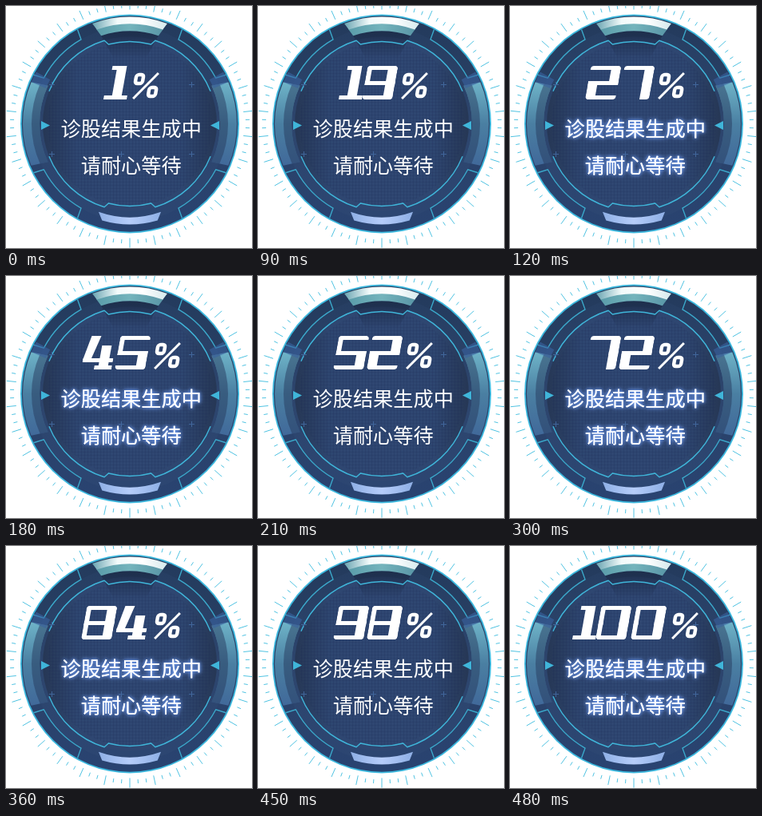
Recreate the animation shown at these times as an HTML page with a canvas. Size 308 by 303 pixels, loop 5.48 s.

```html
<!DOCTYPE html>
<html lang="zh-CN">
<meta charset="utf-8">
<style>
html, body { margin: 0; width: 100%; height: 100%; overflow: hidden; background: #fff }
canvas { display: block }
</style>
<canvas id="stage" width="308" height="303"></canvas>
<script>
const ctx = stage.getContext('2d');
const CX = 155, CY = 147.5, CYAN = '#3fb5d9';
const LOOP = 5480, STEP = 30;
const COUNTS = [1, 7, 13, 19, 27, 36, 45, 52, 59, 66, 72, 78, 84, 89, 94, 98, 100];

// Angles are in degrees, clockwise from the top of the dial.
const rad = a => (a - 90) * Math.PI / 180;
const polar = (r, a) => [CX + r * Math.cos(rad(a)), CY + r * Math.sin(rad(a))];
const arc = (r, a, b) => ctx.arc(CX, CY, r, rad(a), rad(b), b < a);

function disc(r, fill) {
  ctx.beginPath();
  arc(r, 0, 360);
  ctx.fillStyle = fill;
  ctx.fill();
}

function gradient(x0, y0, x1, y1, ...colors) {
  const g = ctx.createLinearGradient(x0, y0, x1, y1);
  colors.forEach((c, i) => g.addColorStop(i / (colors.length - 1), c));
  return g;
}

function block(r0, r1, mid, outer, inner, fill) {
  ctx.beginPath();
  arc(r1, mid - outer, mid + outer);
  arc(r0, mid + inner, mid - inner);
  ctx.closePath();
  ctx.fillStyle = fill;
  ctx.fill();
}

function line(color, width, draw) {
  ctx.beginPath();
  draw();
  ctx.strokeStyle = color;
  ctx.lineWidth = width;
  ctx.stroke();
}

function ticks() {
  for (let i = 0; i < 90; i++) {
    const long = i % 3 === 0;
    line('#4fc3e2', 1, () => {
      ctx.moveTo(...polar(long ? 143 : 145, i * 4));
      ctx.lineTo(...polar(long ? 155 : 150, i * 4));
    });
  }
}

function texture() {
  ctx.save();
  ctx.beginPath();
  arc(103, 0, 360);
  ctx.clip();
  ctx.fillStyle = 'rgba(28,42,85,.16)';
  for (let p = 50; p < 262; p += 4) {
    ctx.fillRect(p, 44, 1, 210);
    ctx.fillRect(50, p - 6, 210, 1);
  }
  ctx.restore();
}

function quadrant(mid) {
  line('#3ba9cb', 1.4, () => {
    ctx.moveTo(...polar(135, mid - 17));
    ctx.lineTo(...polar(122, mid - 16));
    arc(122, mid - 16, mid + 16);
    ctx.lineTo(...polar(135, mid + 17));
  });
}

function frameLine(mid) {
  line(CYAN, 1.4, () => {
    arc(109, mid - 68, mid - 17);
    ctx.lineTo(...polar(103, mid - 15));
    arc(103, mid - 15, mid + 15);
    ctx.lineTo(...polar(109, mid + 17));
    arc(109, mid + 17, mid + 68);
  });
}

function pointer(x, dir) {
  ctx.beginPath();
  ctx.moveTo(x, 144);
  ctx.lineTo(x + dir * 11, 149.5);
  ctx.lineTo(x, 155);
  ctx.fillStyle = CYAN;
  ctx.fill();
}

function sideBlock(mid) {
  block(113, 134, mid, 23, 25, gradient(0, 95, 0, 200, '#6fb4c8', '#4a7fa2', '#41699a'));
  block(113, 123, mid, 24, 25, 'rgba(38,58,95,.5)');
}

function dial() {
  ctx.fillStyle = '#fff';
  ctx.fillRect(0, 0, 308, 303);
  ticks();
  disc(137, '#3bb8de');
  disc(135.2, gradient(0, 12, 0, 283, '#233a5c', '#2a4268', '#294371'));
  disc(122, gradient(0, 26, 0, 270, '#263e62', '#2d456d', '#2c4672'));
  disc(109, gradient(46, 0, 264, 0, '#263755', '#2e4670', '#2f4772', '#2f4772', '#2e4670', '#263755'));
  block(85, 116, 0, 18, 14, gradient(0, 34, 0, 66, 'rgba(28,44,72,.8)', 'rgba(28,44,72,0)'));
  texture();
  [-46, 46, 134, 226].forEach(quadrant);
  frameLine(0);
  frameLine(180);

  block(116, 126, 0, 19.5, 18, gradient(116, 0, 194, 0, '#5c9eab', '#74b4bc', '#5b98a8'));
  block(125, 134, 0, 20.5, 19.3, gradient(108, 0, 202, 0, '#6aa5b2', '#f2fafa', '#fff', '#d5e9ec'));
  sideBlock(90);
  sideBlock(270);
  for (const a of [-64, 64]) block(114, 134, a, 3, 3, 'rgba(58,98,160,.6)');
  block(117, 126, 180, 16, 19.5, gradient(116, 0, 194, 0, '#8eafe5', '#b6cdfa', '#8eafe5'));

  pointer(44, 1);
  pointer(267, -1);
  ctx.fillStyle = '#40659a';
  for (const [x, y] of [[57, 98], [232, 98], [57, 185], [144, 185], [232, 185]]) {
    ctx.fillRect(x - 3, y, 7, 1);
    ctx.fillRect(x, y - 3, 1, 7);
  }
}

// Strokes of the numerals: capitals are heavy stems, lower case thin ones.
const STROKES = {
  a: [0, 0, 38, 5], m: [0, 19, 38, 5], z: [0, 37, 38, 5],
  l: [0, 0, 6, 24], L: [0, 0, 12, 24], k: [0, 19, 6, 24], K: [0, 19, 12, 24],
  r: [32, 0, 6, 24], R: [26, 0, 12, 24], q: [32, 19, 6, 24], Q: [26, 19, 12, 24],
  f: [5, 0, 10, 5], s: [11, 0, 12, 42], b: [1, 37, 29, 5],
  c: [0, 28, 38, 5], S: [21, 12, 12, 30], e: [16, 37, 22, 5]
};
const NUMERALS = ['azlkRQ', 'fsb', 'aRmKz', 'amzRQ', 'cSe', 'almQz', 'aLKmqz', 'aRQ', 'azmlkRQ', 'almRQz'];
const advance = d => d === '1' ? 30 : d === '0' ? 44 : 42;

function numeral(d) {
  ctx.save();
  ctx.beginPath();
  ctx.roundRect(0, 0, 38, 42, d === '1' || d === '4' ? 0 : 4);
  ctx.clip();
  for (const s of NUMERALS[d]) ctx.fillRect(...STROKES[s]);
  if (d === '4') {
    ctx.beginPath();
    [[6, 0], [18, 0], [10, 30], [0, 30]].forEach(p => ctx.lineTo(...p));
    ctx.fill();
  }
  ctx.restore();
}

function percent() {
  line('#fff', 4.5, () => {
    ctx.roundRect(7, 11, 9, 11, 3);
    ctx.roundRect(26, 27, 9, 11, 3);
  });
  line('#fff', 3.2, () => {
    ctx.moveTo(34, 9);
    ctx.lineTo(8, 41);
  });
}

function counter(n) {
  const digits = [...String(n)];
  const width = digits.reduce((sum, d) => sum + advance(d), 31);
  ctx.save();
  ctx.transform(1, 0, -.18, 1, CX - width / 2 + 4, 75);
  ctx.fillStyle = '#fff';
  for (const d of digits) {
    numeral(d);
    ctx.translate(advance(d), 0);
  }
  percent();
  ctx.restore();
}

function caption(glow) {
  ctx.save();
  ctx.font = '500 25.2px "Noto Sans CJK SC", "Noto Sans CJK", sans-serif';
  ctx.textAlign = 'center';
  ctx.fillStyle = '#fff';
  if (glow) {
    ctx.shadowColor = '#6f9df5';
    ctx.shadowBlur = 5;
  }
  for (const [text, y] of [['诊股结果生成中', 162.5], ['请耐心等待', 208.5]]) {
    ctx.fillText(text, 156.7, y);
    if (glow) ctx.fillText(text, 156.7, y);
  }
  ctx.restore();
}

let shown = -1;
const start = performance.now();
function tick() {
  const t = (performance.now() - start) % LOOP;
  const step = Math.min(16, Math.floor(t / STEP));
  if (step !== shown) {
    shown = step;
    dial();
    counter(COUNTS[step]);
    caption(step > 0 && step % 2 === 0);
  }
  requestAnimationFrame(tick);
}
tick();
</script>
</html>
```
